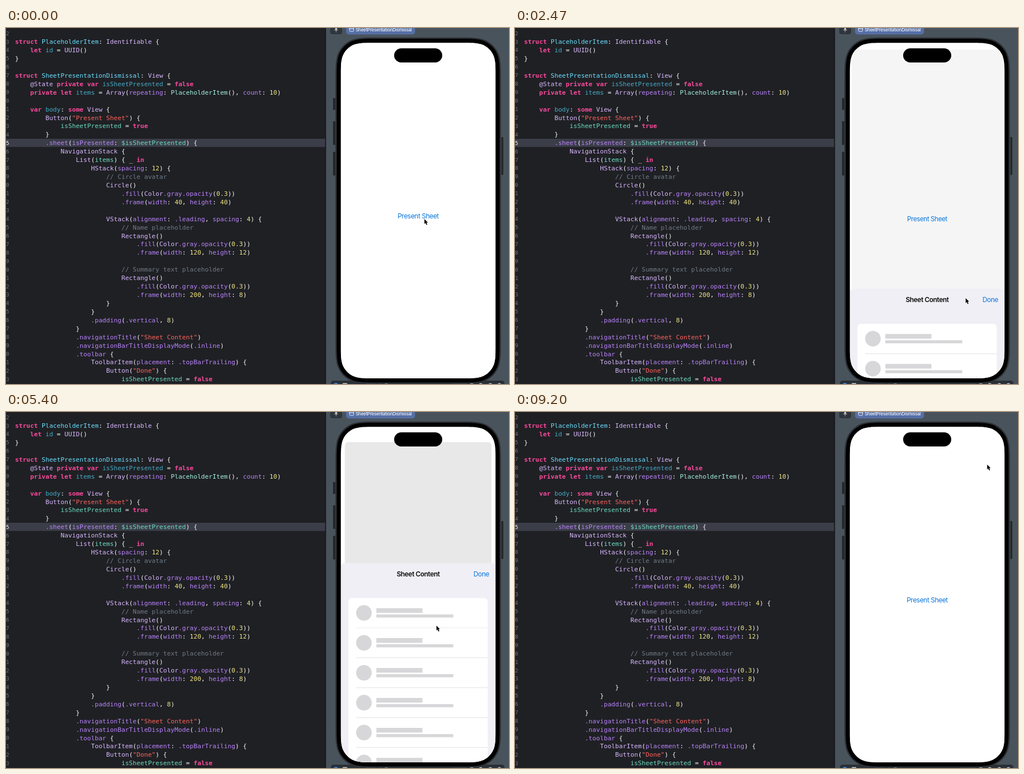
An HTML page with a canvas that plays this animation: 889 px wide and 630 px high, repeating every 9400 ms.

```html
<!DOCTYPE html>
<html lang="en">
<head>
<meta charset="utf-8">
<title>Sheet presentation</title>
<style>
  html, body { margin: 0; width: 100%; height: 100%; overflow: hidden; background: #1f2024; }
  canvas { display: block; width: 889px; height: 630px; }
</style>
</head>
<body>
<canvas id="stage" width="889" height="630"></canvas>
<script>
const LOOP = 9400;
const ctx = document.getElementById('stage').getContext('2d');

const code = `
struct PlaceholderItem: Identifiable {
    let id = UUID()
}

struct SheetPresentationDismissal: View {
    @State private var isSheetPresented = false
    private let items = Array(repeating: PlaceholderItem(), count: 10)

    var body: some View {
        Button("Present Sheet") {
            isSheetPresented = true
        }
        .sheet(isPresented: $isSheetPresented) {
            NavigationStack {
                List(items) { _ in
                    HStack(spacing: 12) {
                        // Circle avatar
                        Circle()
                            .fill(Color.gray.opacity(0.3))
                            .frame(width: 40, height: 40)

                        VStack(alignment: .leading, spacing: 4) {
                            // Name placeholder
                            Rectangle()
                                .fill(Color.gray.opacity(0.3))
                                .frame(width: 120, height: 12)

                            // Summary text placeholder
                            Rectangle()
                                .fill(Color.gray.opacity(0.3))
                                .frame(width: 200, height: 8)
                        }
                    }
                    .padding(.vertical, 8)
                }
                .navigationTitle("Sheet Content")
                .navigationBarTitleDisplayMode(.inline)
                .toolbar {
                    ToolbarItem(placement: .topBarTrailing) {
                        Button("Done") {
                            isSheetPresented = false`.split('\n');

const MONO = '"DejaVu Sans Mono", monospace';
const SANS = 'Inter, "Liberation Sans", sans-serif';
const BLUE = '#0a75dc';
const LINE = 14.93, CHAR = 6.7125;
const SCREEN = { x: 591.8, y: 26.2, w: 273.4, h: 593.8, r: 39 };
const MID = SCREEN.x + SCREEN.w / 2;
const OPEN = 75, CLOSED = 620;

// Cursor path: time, x, y of the tip
const cursorKeys = [
  [0, 739, 337], [1230, 739, 337], [1600, 787, 104], [1660, 787, 106],
  [1730, 789, 131], [2200, 794, 378], [2470, 796, 477], [2600, 796, 479],
  [3150, 747, 338], [3750, 747, 338], [4200, 747, 300], [4400, 747, 300],
  [4930, 752, 170], [5070, 752, 170], [5550, 764, 470], [5750, 764, 475],
  [6270, 760, 367], [6650, 756, 336], [7250, 756, 336], [7800, 818, 136],
  [7870, 819, 132], [8070, 838, 87], [8230, 838, 87], [8330, 834, 92]
];
const firstDrag = [[1660, 75], [1730, 87], [2200, 345], [2450, 434]];
const secondDrag = [[5070, 75], [5140, 87], [5550, 370]];

function along(keys, t) {
  const next = keys.findIndex(key => key[0] > t);
  if (next < 0) return keys[keys.length - 1].slice(1);
  const a = keys[Math.max(0, next - 1)], b = keys[next];
  const u = b === a ? 0 : (t - a[0]) / (b[0] - a[0]);
  return a.slice(1).map((v, i) => v + (b[i + 1] - v) * u);
}

const settle = (from, to, ms, rate = 7.6) => to + (from - to) * Math.exp(-rate * ms / 1000);

function sheetTop(t) {
  if (t < 300) return CLOSED;
  if (t < 1660) return settle(CLOSED, OPEN, t - 300);
  if (t < 2450) return along(firstDrag, t)[0];
  if (t < 3565) return settle(434, CLOSED, t - 2450);
  if (t < 5070) return settle(CLOSED, OPEN, t - 3565);
  if (t < 5550) return along(secondDrag, t)[0];
  if (t < 6790) return settle(370, CLOSED, t - 5550);
  if (t < 8560) return settle(CLOSED, OPEN, t - 6790);
  return settle(OPEN, CLOSED, t - 8560, 9);
}

function box(x, y, w, h, r, fill) {
  ctx.fillStyle = fill;
  ctx.beginPath();
  ctx.roundRect(x, y, w, h, r);
  ctx.fill();
}

// Rectangle whose corners ease into the sides
function smoothPath({ x, y, w, h, r }) {
  const far = 1.5287 * r, near = 0.6315 * r, low = 0.0749 * r;
  ctx.beginPath();
  for (let i = 0; i < 4; i++) {
    ctx.save();
    ctx.translate(x + w / 2, y + h / 2);
    ctx.rotate(i * Math.PI / 2);
    const [a, b] = i % 2 ? [h, w] : [w, h];
    ctx.translate(a / 2, -b / 2);
    ctx.lineTo(-far, 0);
    ctx.bezierCurveTo(-1.0885 * r, 0, -0.8684 * r, 0, -near, low);
    ctx.bezierCurveTo(-0.3728 * r, 0.1691 * r, -0.1691 * r, 0.3728 * r, -low, near);
    ctx.bezierCurveTo(0, 0.8684 * r, 0, 1.0885 * r, 0, far);
    ctx.restore();
  }
  ctx.closePath();
}

function smoothBox(shape, grow, fill) {
  const { x, y, w, h, r } = shape;
  smoothPath({ x: x - grow, y: y - grow, w: w + 2 * grow, h: h + 2 * grow, r: r + grow });
  ctx.fillStyle = fill;
  ctx.fill();
}

function disc(x, y, r, fill) {
  ctx.fillStyle = fill;
  ctx.beginPath();
  ctx.arc(x, y, r, 0, 7);
  ctx.fill();
}

function label(str, x, y, font, fill, align = 'left', spacing = 0) {
  ctx.font = font;
  ctx.letterSpacing = spacing + 'px';
  ctx.textAlign = align;
  ctx.fillStyle = fill;
  ctx.fillText(str, x, y);
  ctx.letterSpacing = '0px';
}

const TOKEN = /(?<comment>\/\/.*)|(?<string>".*?")|(?<keyword>\b(?:struct|let|var|private|some|in|true|false)\b)|(?<number>\d+(?:\.\d+)?)|(?<type>@?[A-Z]\w*)|(?<name>[.$]?[a-z]\w*)|\S/g;
const COLORS = {
  comment: '#6f7a86', string: '#ff625c', keyword: '#fc4a9e', number: '#f2e783',
  type: '#d9b8ff', name: '#b983fb', plain: '#f6f6f7',
  declaredType: '#6bdfff', declared: '#45abc8', own: '#6bdcc0', ownType: '#a4f3e0'
};

function tokenKind(match, before) {
  const word = match[0];
  const kind = Object.keys(match.groups).find(k => match.groups[k]) || 'plain';
  if (before === 'struct') return 'declaredType';
  if (before === 'let' || before === 'var') return 'declared';
  if (word === 'PlaceholderItem') return 'ownType';
  if (/^\$?(isSheetPresented|items)$/.test(word)) return 'own';
  return kind;
}

function drawCode() {
  box(0, 0, 564, 630, 0, '#1f2024');
  box(0, 196, 564, 14.5, 0, '#3b3d48');
  code.forEach((line, i) => {
    const y = 13.2 + i * LINE;
    label((i + 2) % 10, 5.5, y - 0.6, '8.8px ' + MONO, i === 13 ? '#fff' : '#75777d', 'right');
    let before = '';
    for (const match of line.matchAll(TOKEN)) {
      const kind = tokenKind(match, before);
      const weight = kind === 'keyword' ? 'bold ' : '';
      label(match[0], 16 + match.index * CHAR, y, weight + '11.15px ' + MONO, COLORS[kind]);
      before = match[0];
    }
  });
}

function drawCanvasPane() {
  box(564, 0, 325, 630, 0, '#49535c');
  box(564, 0, 1.5, 630, 0, '#111214');

  // Pin and preview tab
  box(573, -10, 21, 21, 4, '#2f353b');
  box(581.8, 0, 3.4, 3.2, 1, '#c4c8cc');
  box(580.3, 3.2, 6.4, 1, 0, '#c4c8cc');
  box(583.1, 4, 0.8, 3.4, 0, '#c4c8cc');
  box(601, -12, 122, 23.5, 5, '#566fa5');
  ctx.strokeStyle = '#e9eef8';
  ctx.lineWidth = 1;
  ctx.beginPath();
  ctx.roundRect(607, -0.5, 7.5, 6.5, 1.5);
  ctx.moveTo(607, 1.5);
  ctx.lineTo(614.5, 1.5);
  ctx.stroke();
  label('SheetPresentationDismissal', 618, 6, '500 8px ' + SANS, '#f4f6fb', 'left', -0.3);

  // Toolbar peeking in at the bottom
  box(574, 624, 85, 20, 5, '#2a3036');
  box(664, 624, 124, 20, 5, '#2a3036');
  box(814, 624, 67, 20, 5, '#2a3036');
  box(637, 625, 17, 16, 4, '#2d4d68');
  disc(583, 632, 4, '#3b86dc');
  for (const x of [823, 839, 856, 872, 672]) disc(x, 632, 3.6, '#c9cdd1');
  box(595, 628.5, 8, 8, 1, '#c9cdd1');
}

function drawPhone() {
  for (const [y, h] of [[124, 21], [165, 42], [219, 42]]) box(578, y, 4, h, 1.2, '#24272a');
  box(875.5, 193, 3.5, 67, 1.2, '#24272a');
  smoothBox(SCREEN, 9.5, '#2c3034');
  smoothBox(SCREEN, 7.2, '#000');
  smoothBox(SCREEN, 0, '#fff');
}

function drawPresenter(p) {
  ctx.save();
  ctx.translate(MID, SCREEN.y + 41.6 * p);
  ctx.scale(1 - 0.08 * p, 1 - 0.08 * p);
  const shade = Math.round(255 * (1 - 0.138 * p));
  box(-SCREEN.w / 2, 0, SCREEN.w, SCREEN.h, 7, `rgb(${shade},${shade},${shade})`);
  label('Present Sheet', 0, 311, '11.8px ' + SANS, BLUE, 'center', -0.42);
  ctx.restore();
}

function drawSheet(top) {
  box(SCREEN.x, top, SCREEN.w, 640, 7, '#f0eff5');
  label('Sheet Content', MID, top + 23.8, '600 11.8px ' + SANS, '#0b0b0c', 'center', -0.42);
  label('Done', 854, top + 23.8, '11.8px ' + SANS, BLUE, 'right', -0.42);

  const list = top + 62;
  box(605, list, 246.5, 529, 7, '#fff');
  for (let row = 0; row < 10; row++) {
    const y = list + row * 52.95;
    disc(632.6, y + 26.4, 13.8, '#d7d7d9');
    box(654.5, y + 18, 81.5, 8.3, 0, '#d7d7d9');
    box(654.5, y + 29, 136, 5.5, 0, '#d7d7d9');
    if (row < 9) box(619, y + 52.5, 232.5, 0.7, 0, '#d6d6d9');
  }
}

function drawCursor(x, y) {
  ctx.save();
  ctx.translate(x, y + 0.6);
  ctx.beginPath();
  for (const [px, py] of [[0.5, 0.5], [0.5, 9.2], [2.4, 7.5], [4, 11], [5.6, 10.3], [4.1, 6.9], [6.6, 6.7]]) ctx.lineTo(px, py);
  ctx.closePath();
  ctx.lineJoin = 'round';
  ctx.lineWidth = 1.5;
  ctx.strokeStyle = '#fff';
  ctx.stroke();
  ctx.fillStyle = '#000';
  ctx.fill();
  ctx.restore();
}

function draw(t) {
  drawCode();
  drawCanvasPane();
  drawPhone();

  const top = sheetTop(t);
  const shown = top < CLOSED - 1.8;
  ctx.save();
  smoothPath(SCREEN);
  ctx.clip();
  drawPresenter(shown ? (CLOSED - top) / (CLOSED - OPEN) : 0);
  if (shown) drawSheet(top);
  ctx.restore();

  box(686, 36, 85, 25, 12.5, '#000');
  drawCursor(...along(cursorKeys, t));
}

const start = performance.now();
function tick() {
  draw((performance.now() - start) % LOOP);
  requestAnimationFrame(tick);
}
tick();
</script>
</body>
</html>
```
